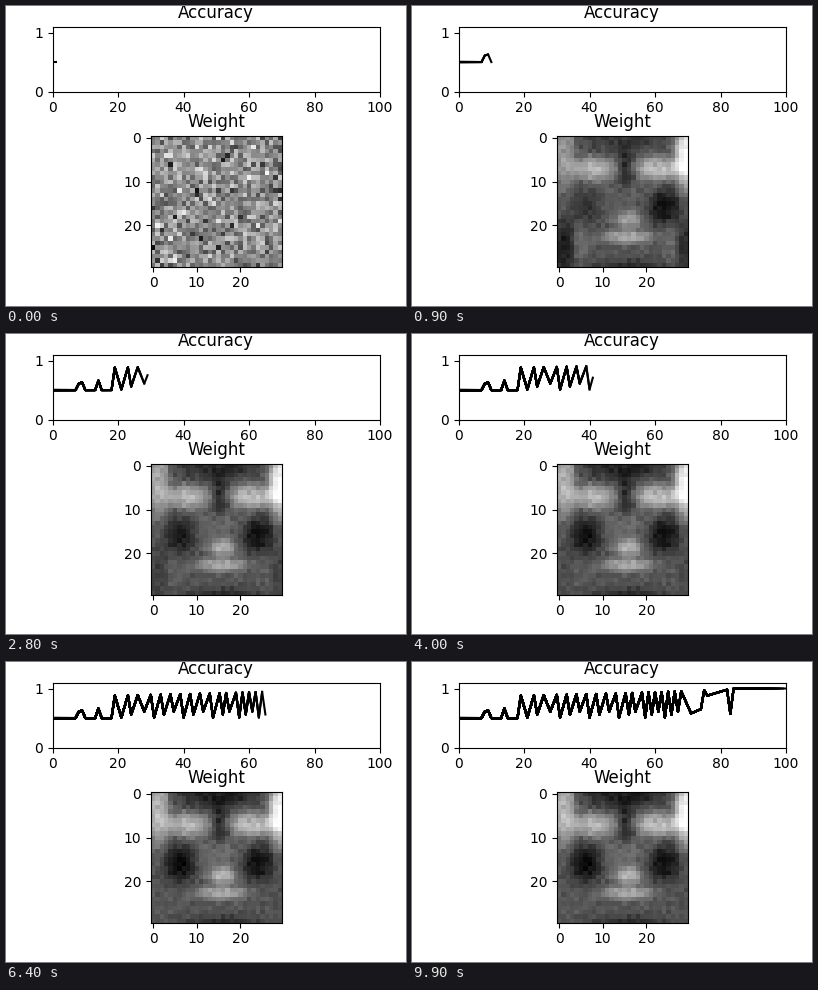
Animation of 400x300 px, one loop 10 s. Source, as a matplotlib script:

```python
import numpy as np
import matplotlib.pyplot as plt
from matplotlib.animation import FuncAnimation

W, H, FRAMES, SIZE = 400, 300, 100, 30

rng = np.random.default_rng(4)
noise = np.clip(rng.normal(.55, .15, (SIZE, SIZE)), 0, 1)
grain = rng.normal(0, .03, (SIZE, SIZE))
rows, cols = np.mgrid[:SIZE, :SIZE]


def accuracy_curve():
    # chance level, then ever quicker swings, then convergence
    start = [(0, .5), (7, .5), (8, .61), (9, .63), (10, .5),
             (13, .5), (14, .66), (15, .5), (18, .5)]
    k = np.arange(19)
    peaks = np.round(19 + 3.72 * k - .0556 * k ** 2)
    dips = (peaks[:-1] + peaks[1:]) // 2
    swings = sorted([*zip(peaks, .88 + .004 * k),
                     *zip(dips, .51 + .05 * (k % 3))])
    end = [(71, .58), (74, .65), (75, .97), (76, .88),
           (82, .98), (83, .57), (84, 1), (100, 1)]
    x, y = zip(*start, *swings, *end)
    return np.interp(np.arange(FRAMES + 1), x, y)


def spot(x, y, sx, sy, gain):
    d = ((cols - x) / sx) ** 2 + ((rows - y) / sy) ** 2
    return gain * np.exp(-d ** 1.5)


def pair(dx, y, sx, sy, left, right):
    return (spot(15.2 - dx, y, sx, sy, left)
            + spot(15.2 + dx, y, sx, sy, right))


def weight_map(late):
    early = 1 - late
    img = .33 + grain
    img = img + pair(14, 4, 2.8, 7.5, .26 + .12 * late, .65)
    img += pair(7.2, 7, 5, 2.7, .38, .43)
    img += pair(9, 16, 3.6, 4.3, -.12 - .16 * late, -.26)
    img += pair(14, 25, 3, 6, -.22 * early, -.14 * early)
    img += pair(10.5, 24, 1.7, 5, .12 * early, .1 * early)
    img += spot(15, 0, 9, 3.2, -.12 - .1 * late)       # forehead
    img += spot(15.4, 7, 1.7, 4.5, -.17)               # bridge
    img += spot(15, 14, 4.5, 3.6, .04 + .06 * late)
    img += spot(15.8, 18.7, 3.2, 1.9, .28 + .08 * late)
    img += spot(15.5, 22.6, 6, 1.6, .32)
    img += spot(16, 29.5, 9, 1.8, -.15)
    return np.clip(img, 0, 1)


def weights(i):
    if i == 0:
        return noise
    late = np.interp(i, [9, 18, 40, 55], [0, .4, .85, 1])
    mix = .4 ** i
    return mix * noise + (1 - mix) * weight_map(late)


def add_axes(left, top, right, bottom, title):
    ax = fig.add_axes([left / W, 1 - bottom / H,
                       (right - left) / W, (bottom - top) / H])
    ax.set_title(title)
    return ax


fig = plt.figure(figsize=(W / 100, H / 100), dpi=100)

top = add_axes(46.6, 20.6, 374, 85.6, "Accuracy")
top.set(xlim=(0, 100), ylim=(0, 1.1), yticks=[0, 1])

low = add_axes(144.9, 129.8, 275.7, 260.7, "Weight")
image = low.imshow(noise, cmap="gray", vmin=0, vmax=1,
                   interpolation="nearest", aspect="auto")
low.set(xticks=[0, 10, 20], yticks=[0, 10, 20])

# every step adds one more line over the earlier ones
accuracy = accuracy_curve()
lines = [top.plot(accuracy[:k + 2], color="black", lw=1.5)[0]
         for k in range(FRAMES)]


def update(i):
    for k, line in enumerate(lines):
        line.set_visible(k <= i)
    image.set_data(weights(i))
    return [image, *lines]


anim = FuncAnimation(fig, update, frames=FRAMES, interval=100,
                     repeat=True, repeat_delay=0)
plt.show()
```
